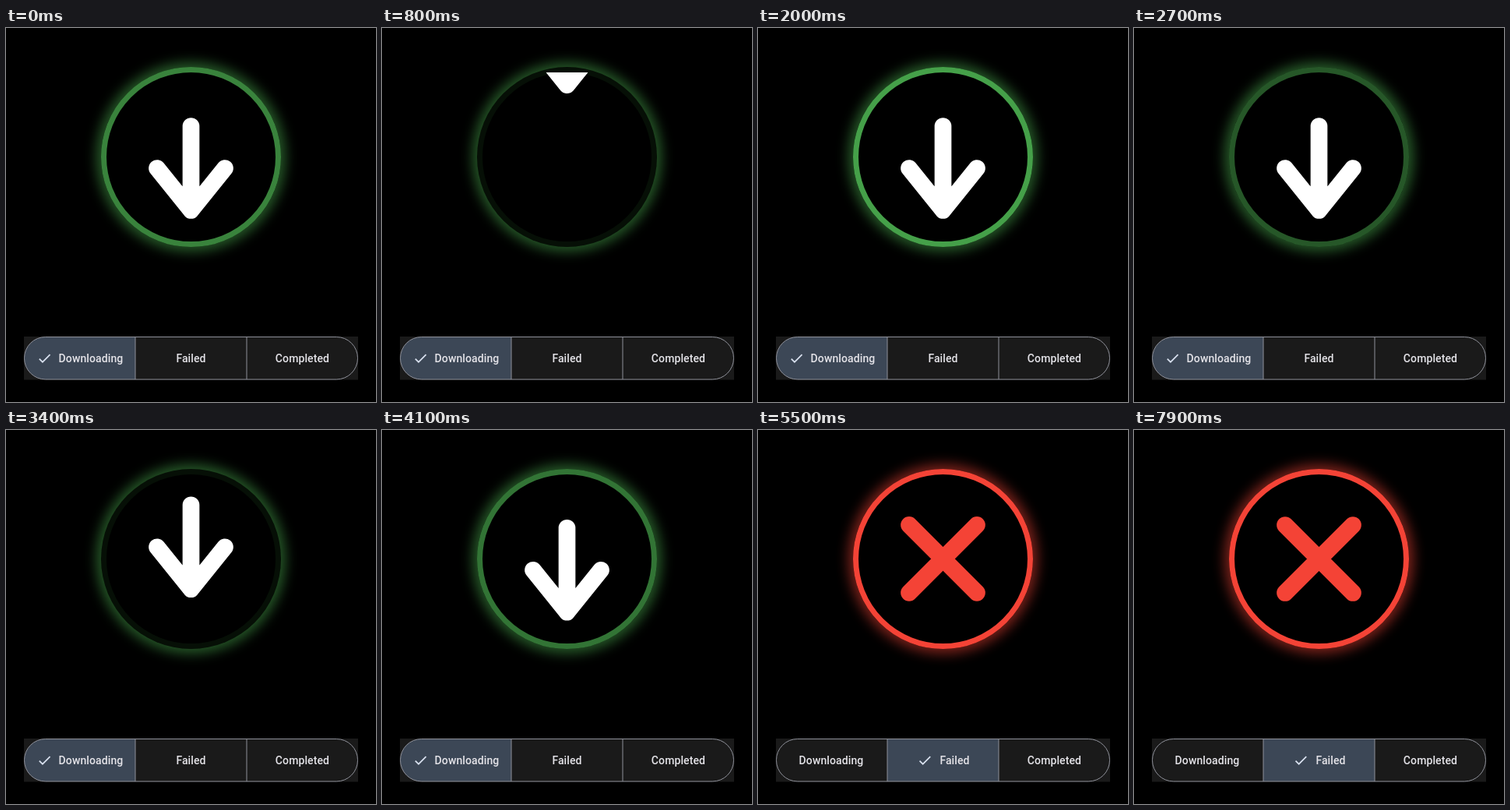
These frames come from a looping animation (475 px wide and 480 px high, 8 s). An HTML page:

```html
<!DOCTYPE html>
<html lang="en">
<head>
<meta charset="utf-8">
<title>Download status</title>
<style>
  html, body { margin: 0; width: 100%; height: 100%; overflow: hidden; background: #000; }
  #glow {
    position: absolute; left: 122px; top: 50px; width: 231px; height: 231px;
    border-radius: 50%; background: #000;
  }
  svg { position: absolute; left: 0; top: 0; }
  .icon { fill: none; stroke-width: 21.7; stroke-linecap: round; stroke-linejoin: round; }
  text {
    font: 500 14px Roboto, sans-serif; letter-spacing: .1px;
    text-anchor: middle; fill: #e4e3e8;
  }
  .outline { fill: none; stroke: #8e9099; stroke-width: 1; }
</style>
</head>
<body>
<div id="glow"></div>
<svg width="475" height="480" viewBox="0 0 475 480">
  <clipPath id="iconBox"><rect x="129" y="57" width="217" height="217"/></clipPath>
  <clipPath id="pill"><rect x="23.5" y="396.5" width="428" height="54.5" rx="27.25"/></clipPath>

  <circle id="ring" cx="237.5" cy="165.5" r="112" fill="none" stroke-width="7"/>
  <g clip-path="url(#iconBox)">
    <path id="arrow" class="icon" stroke="#fff" d="M237.5 126V234M194 180L237.5 234L281 180"/>
    <path id="cross" class="icon" stroke="#f44336" d="M194 122L281 209M281 122L194 209"/>
  </g>

  <rect x="23" y="396" width="429" height="55.5" fill="#1a1a1a"/>
  <rect id="selection" y="396" width="143" height="56" fill="#3c4756" clip-path="url(#pill)"/>
  <rect class="outline" x="23.5" y="396.5" width="428" height="54.5" rx="27.25"/>
  <path class="outline" d="M166 396.5V451M309 396.5V451"/>
  <path id="check" fill="#dae2f0" d="M9 16.17L4.83 12L3.41 13.41L9 19L21 7L19.59 5.59z"/>
  <text y="429">Downloading</text>
  <text y="429">Failed</text>
  <text x="380.5" y="429">Completed</text>
</svg>
<script>
const LOOP = 8000, FAIL_AT = 4450, CROSS_AT = 4510;
const PULSE = 2400, ARROW_AT = 744, RING_DARK_AT = 900;
const SLIDE = 1300, BOX = 217;

const $ = id => document.getElementById(id);
const mod = (a, n) => ((a % n) + n) % n;
const [downloadLabel, failedLabel] = document.querySelectorAll("text");

// Fast start with a long, slow tail: cubic-bezier(.18, 1, .04, 1)
function remaining(x) {
  if (x <= 0) return 1;
  if (x >= 1) return 0;
  let lo = 0, hi = 1;
  for (let i = 0; i < 30; i++) {
    const s = (lo + hi) / 2, r = 1 - s;
    if (.54 * s * r * r + .12 * s * s * r + s ** 3 < x) lo = s; else hi = s;
  }
  return (1 - lo) ** 3;
}

function slide(icon, elapsed) {
  icon.setAttribute("transform", `translate(0 ${-BOX * remaining(elapsed / SLIDE)})`);
}

function show(icon, visible) {
  icon.setAttribute("visibility", visible ? "visible" : "hidden");
}

function draw(t) {
  const failed = t >= FAIL_AT;
  const rgb = failed ? "244, 67, 54" : "76, 175, 80";
  const pulse = 1 - Math.abs(1 - mod(t - RING_DARK_AT, PULSE) / (PULSE / 2));

  $("glow").style.boxShadow = `0 0 16px 6px rgba(${rgb}, .5)`;
  $("ring").setAttribute("stroke", `rgb(${rgb})`);
  $("ring").setAttribute("stroke-opacity", failed ? 1 : pulse);

  show($("arrow"), t < CROSS_AT);
  show($("cross"), t >= CROSS_AT);
  slide($("arrow"), mod(t - ARROW_AT, PULSE));
  slide($("cross"), t - CROSS_AT);

  $("selection").setAttribute("x", failed ? 166 : 23);
  $("check").setAttribute("transform", `translate(${failed ? 204 : 39.3} 413.8) scale(.85)`);
  downloadLabel.setAttribute("x", failed ? 94 : 109);
  failedLabel.setAttribute("x", failed ? 252.5 : 237.5);
}

const start = performance.now();
function tick() {
  draw((performance.now() - start) % LOOP);
  requestAnimationFrame(tick);
}
tick();
</script>
</body>
</html>
```
